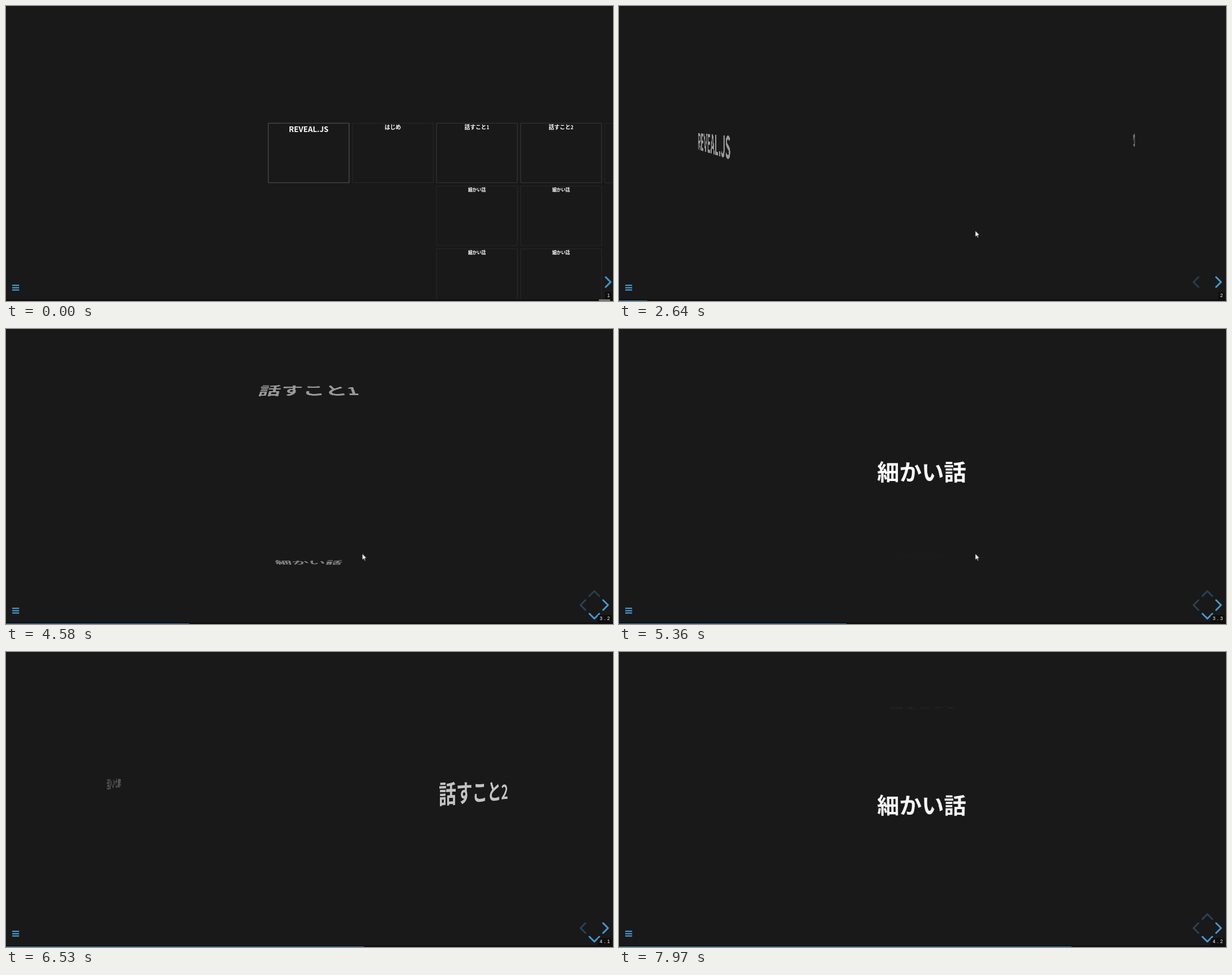
Animation, 1073 px wide and 522 px high, one loop 8000 ms. Source, as an HTML page:

```html
<!DOCTYPE html>
<html lang="ja">
<head>
<meta charset="utf-8">
<title>Slides</title>
<style>
  :root {
    --ease: cubic-bezier(.26, .86, .44, .985);
    --cut: cubic-bezier(.3, .687, .528, .922); /* --ease up to the loop end */
    --blue: #4aa7e6;
    --rest: translate3d(0, 0, 0) rotateY(0deg) translate3d(0, 0, 0);
    --left: translate3d(-100%, 0, 0) rotateY(-90deg) translate3d(-100%, 0, 0);
    --right: translate3d(100%, 0, 0) rotateY(90deg) translate3d(100%, 0, 0);
    --level: perspective(600px) translate3d(0, 0, 0) rotateX(0deg) translate3d(0, 0, 0);
    --up: perspective(600px) translate3d(0, -300px, 0) rotateX(70deg) translate3d(0, -300px, 0);
    --down: perspective(600px) translate3d(0, 300px, 0) rotateX(-70deg) translate3d(0, 300px, 0);
    --almost-up: perspective(600px) translate3d(0, -289px, 0) rotateX(67.4deg) translate3d(0, -289px, 0);
    --almost-level: perspective(600px) translate3d(0, 11px, 0) rotateX(-2.6deg) translate3d(0, 11px, 0);
  }
  html, body { margin: 0; width: 100%; height: 100%; overflow: hidden; background: #191919; }
  body { position: relative; color: #fff; }
  body > * { position: absolute; }

  h1, h2, h3 {
    position: relative; top: -.08em; margin: 0; white-space: nowrap;
    font: 600 67.2px/1.2 "Noto Sans CJK JP", "Noto Sans CJK", sans-serif;
  }
  h1 { top: -3px; font-size: 92px; line-height: 126px; }
  h3 { font-size: 54.6px; }
  h2 span { font-size: .89em; }

  .overview { left: 534.5px; top: 260px; transform: scale(.1444); transform-origin: 0 0; animation: overview 8s step-end infinite; }
  .card {
    position: absolute; box-sizing: border-box; width: 960px; height: 700px;
    left: calc(var(--x) * 1030px - 480px); top: calc(var(--y, 0) * 770px - 350px);
    outline: 10px solid rgba(150, 150, 150, var(--a, .1)); outline-offset: 10px; text-align: center;
  }
  .card > * { margin-top: -4px; }

  .slides { left: 54.5px; top: -87.3px; width: 960px; height: 700px; transform: scale(.722); perspective: 600px; perspective-origin: 50% 40%; }
  section {
    position: absolute; inset: 0; box-sizing: border-box; padding-bottom: 20px;
    display: flex; align-items: center; justify-content: center;
    animation: 8s var(--ease) infinite;
  }

  svg { left: 0; top: 0; width: 1073px; height: 522px; }
  .menu { stroke: var(--blue); stroke-width: 2; }
  .arrow { fill: none; stroke: var(--blue); stroke-width: 3; stroke-linecap: round; stroke-linejoin: round; animation: 8s ease infinite; }
  #right { opacity: .9; animation: bounce-right 8s ease-out infinite; }
  #left { animation-name: left; }
  #up { animation-name: up; }
  #down { animation: down 8s ease infinite, bounce-down 8s ease-out infinite; }
  #cursor { fill: #fff; stroke: #000; stroke-width: .6; animation: cursor 8s linear infinite; }

  .track { left: 0; right: 0; top: 519px; height: 3px; background: #110f11; }
  .bar { left: -2px; top: 521px; width: 0; height: 1px; background: #2f7cb0; animation: bar 8s var(--ease) infinite; }
  .strip { left: 1048px; top: 518.5px; width: 20px; height: 3.5px; background: #747474; animation: strip 8s step-end infinite; }
  #number {
    left: auto; right: calc(100% - 1070.7px); top: 505.5px; padding: 3.3px; background: rgba(0, 0, 0, .4);
    font: 8.4px/7px "Liberation Sans", Arial, sans-serif; white-space: nowrap;
  }
  #number i { margin: 0 3.1px; font-style: normal; }

  @keyframes overview { 0% { opacity: 1; } 20.65%, 100% { opacity: 0; } }
  @keyframes strip { 0% { opacity: 1; } 3.5%, 100% { opacity: 0; } }

  @keyframes s1 {
    0%, 20.64% { opacity: 0; transform: scale(.2); }
    20.65% { opacity: 1; transform: scale(.2); animation-timing-function: ease; }
    25.65% { opacity: 1; transform: scale(1); }
    31.5% { opacity: 1; transform: var(--rest); }
    41.5%, 100% { opacity: 0; transform: var(--left); }
  }
  @keyframes s2 {
    0%, 31.5% { opacity: 0; transform: var(--right); }
    41.5%, 44.6% { opacity: 1; transform: var(--rest); }
    54.6%, 100% { opacity: 0; transform: var(--left); }
  }
  @keyframes s31 {
    0%, 44.6% { opacity: 0; transform: var(--right); }
    54.6% { opacity: 1; transform: var(--rest); }
    55.7% { opacity: 1; transform: var(--level); }
    65.7%, 100% { opacity: 0; transform: var(--up); }
  }
  @keyframes s32 {
    0%, 55.7% { opacity: 0; transform: var(--down); }
    65.7%, 67% { opacity: 1; transform: var(--level); }
    77%, 100% { opacity: 0; transform: var(--up); }
  }
  @keyframes s33 {
    0%, 67% { opacity: 0; transform: var(--down); }
    77% { opacity: 1; transform: var(--level); }
    78.45% { opacity: 1; transform: var(--rest); }
    88.45%, 100% { opacity: 0; transform: var(--left); }
  }
  @keyframes s41 {
    0%, 78.45% { opacity: 0; transform: var(--right); }
    88.45% { opacity: 1; transform: var(--rest); }
    93.4% { opacity: 1; transform: var(--level); animation-timing-function: var(--cut); }
    100% { opacity: .037; transform: var(--almost-up); }
  }
  @keyframes s42 {
    0% { opacity: 0; transform: var(--down); }
    93.4% { opacity: 0; transform: var(--down); animation-timing-function: var(--cut); }
    100% { opacity: .963; transform: var(--almost-level); }
  }

  @keyframes bar {
    0%, 31.7% { width: 0; }
    41.7%, 44.8% { width: 134.6px; }
    54.8%, 55.8% { width: 269.2px; }
    65.8%, 67% { width: 403.8px; }
    77%, 78.6% { width: 538.4px; }
    88.6% { width: 673px; }
    93.4% { width: 673px; animation-timing-function: var(--cut); }
    100% { width: 802.6px; }
  }
  @keyframes bounce-right {
    0% { transform: translateX(4.5px); }
    1.5%, 26.5% { transform: translateX(7px); }
    4%, 29% { transform: translateX(-3.5px); }
    6.5%, 24%, 31.5%, 100% { transform: translateX(0); }
  }
  @keyframes bounce-down {
    0%, 47.3%, 54.8%, 100% { transform: translateY(0); }
    49.8% { transform: translateY(7px); }
    52.3% { transform: translateY(-3.5px); }
  }
  @keyframes left { 0%, 31.5% { opacity: 0; } 34%, 100% { opacity: .3; } }
  @keyframes up {
    0%, 55.7%, 81%, 93.4% { opacity: 0; }
    58.2%, 78.5%, 95.9%, 100% { opacity: .3; }
  }
  @keyframes down {
    0%, 44.6%, 69.5%, 78.5% { opacity: 0; }
    47.1%, 67%, 81%, 100% { opacity: .9; }
  }
  @keyframes cursor {
    0%, 8.4% { transform: translate(1060px, 530px); }
    9% { transform: translate(1052px, 512px); }
    12.5% { transform: translate(800px, 400px); }
    14.5% { transform: translate(655px, 319px); }
    15.7% { transform: translate(625px, 360px); }
    16.6%, 79.1% { transform: translate(629.8px, 397.6px); opacity: 1; }
    79.11%, 100% { transform: translate(629.8px, 397.6px); opacity: 0; }
  }
</style>
</head>
<body>
<div class="overview">
  <div class="card" style="--x:0;--a:.4"><h1>REVEAL.JS</h1></div>
  <div class="card" style="--x:1"><h2>はじめ</h2></div>
  <div class="card" style="--x:2;--a:.2"><h2>話すこと<span>1</span></h2></div>
  <div class="card" style="--x:2;--y:1"><h3>細かい話</h3></div>
  <div class="card" style="--x:2;--y:2"><h3>細かい話</h3></div>
  <div class="card" style="--x:3;--a:.2"><h2>話すこと<span>2</span></h2></div>
  <div class="card" style="--x:3;--y:1"><h3>細かい話</h3></div>
  <div class="card" style="--x:3;--y:2"><h3>細かい話</h3></div>
  <div class="card" style="--x:4"></div>
</div>

<div class="slides">
  <section style="animation-name:s1"><h1>REVEAL.JS</h1></section>
  <section style="animation-name:s2"><h2>はじめ</h2></section>
  <section style="animation-name:s31"><h2>話すこと<span>1</span></h2></section>
  <section style="animation-name:s32"><h3>細かい話</h3></section>
  <section style="animation-name:s33"><h3>細かい話</h3></section>
  <section style="animation-name:s41"><h2>話すこと<span>2</span></h2></section>
  <section style="animation-name:s42"><h3>細かい話</h3></section>
</div>

<div class="track"></div>
<div class="bar"></div>
<div class="strip"></div>
<svg viewBox="0 0 1073 522">
  <path class="menu" d="M11 494.2h12.2M11 498.4h12.2M11 502.6h12.2"/>
  <path class="arrow" id="left" d="M1024.3 479.8l-8.7 8.7 8.7 8.7"/>
  <path class="arrow" id="right" d="M1055.5 479.8l8.7 8.7-8.7 8.7"/>
  <path class="arrow" id="up" d="M1031.3 472.5l8.7-8.7 8.7 8.7"/>
  <path class="arrow" id="down" d="M1031.3 503.8l8.7 8.7 8.7-8.7"/>
</svg>
<div id="number">1</div>
<svg viewBox="0 0 1073 522">
  <path id="cursor" d="M0 0v11l2.5-2.4 1.7 3.8 1.6-.7-1.7-3.7h3.5z"/>
</svg>

<script>
  const number = document.getElementById('number');
  const labels = [[0, '1'], [2520, '2'], [3568, '3.1'], [4456, '3.2'], [5360, '3.3'], [6276, '4.1'], [7472, '4.2']];
  let start, shown;

  function tick(now) {
    start ??= now;
    const t = (now - start) % 8000;
    const label = labels.findLast(([from]) => from <= t)[1];
    if (label !== shown) {
      shown = label;
      number.innerHTML = label.replace('.', '<i>.</i>');
    }
    requestAnimationFrame(tick);
  }
  requestAnimationFrame(tick);
</script>
</body>
</html>
```
